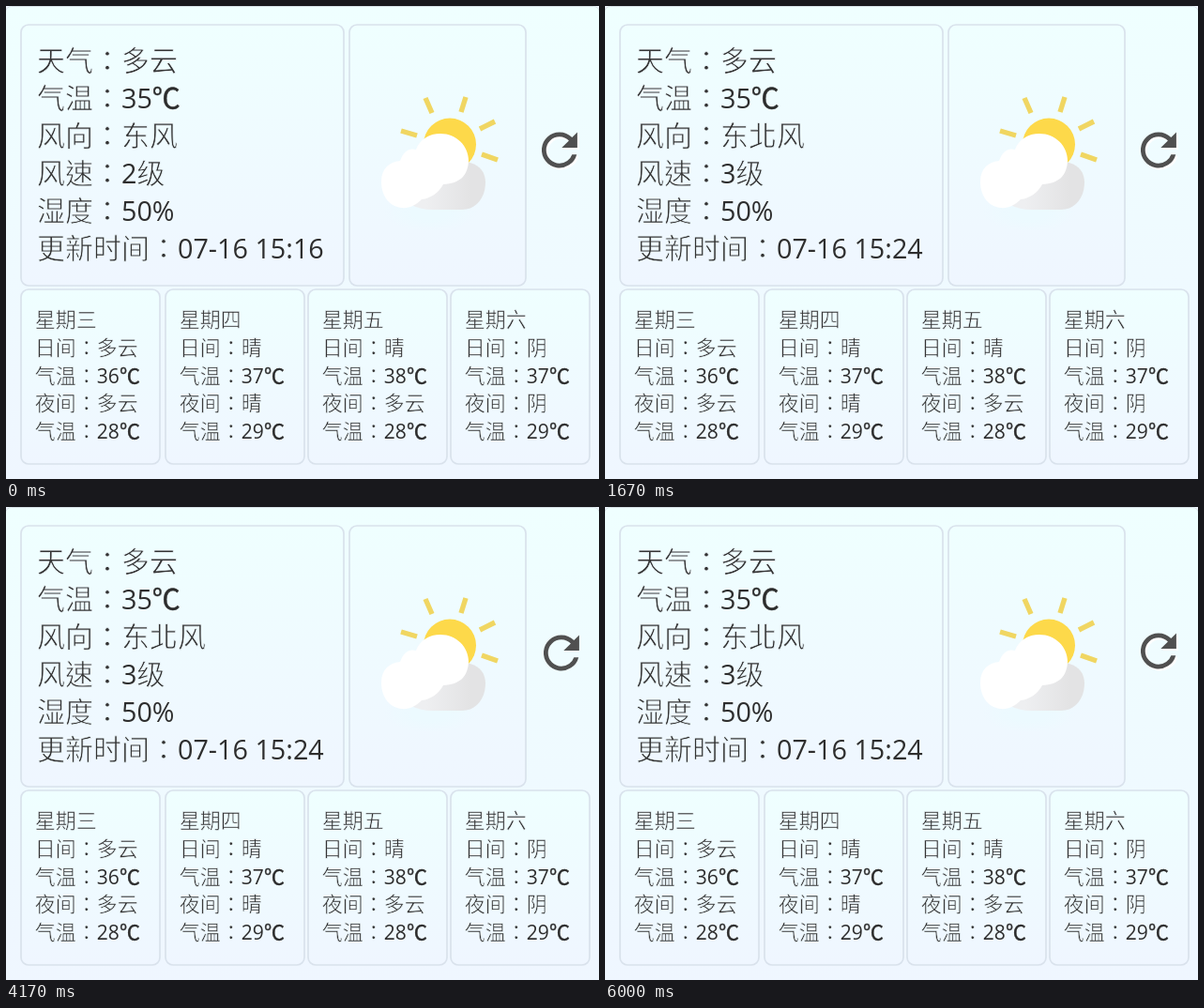
Animation of 632 by 504 pixels, one loop 6800 ms. Source, as an HTML page:

```html
<!DOCTYPE html>
<html lang="zh-TW">
<head>
<meta charset="utf-8">
<style>
  html, body { margin: 0; width: 632px; height: 504px; overflow: hidden; background: #f0f7ff; }
  svg { display: block; }
  text { font-family: "Open Sans", "Noto Sans", sans-serif; fill: #2e2e2e; white-space: pre; }
  /* the pale outline thins the strokes to a light weight */
  .han { font-family: "Noto Sans CJK TC", "Noto Sans CJK SC", "Noto Sans CJK", sans-serif; font-weight: 300; fill: #333; stroke: #effaff; stroke-width: .026em; }
  .unit { font-weight: 500; fill: #2c2c2c; stroke: #2c2c2c; stroke-width: .4; }
  .card { fill: url(#sky); stroke: #d9e2ec; stroke-width: 1.7; }
  .spinner { stroke: #747a7e; stroke-width: 2; }
  .rays { stroke: #f0d662; stroke-width: 5.4; }
</style>
</head>
<body>
<svg id="stage" width="632" height="504" viewBox="0 0 632 504">
  <defs>
    <linearGradient id="sky" x2="0" y2="1">
      <stop stop-color="#efffff"/><stop offset="1" stop-color="#eff6ff"/>
    </linearGradient>
    <linearGradient id="shade">
      <stop offset=".2" stop-color="#eeeff1"/><stop offset=".8" stop-color="#e3e3e4"/>
    </linearGradient>
    <radialGradient id="haze">
      <stop offset=".4" stop-color="#ecfaff"/><stop offset="1" stop-color="#ecfaff" stop-opacity="0"/>
    </radialGradient>
    <path id="reload" d="M17.65 6.35A7.96 7.96 0 0 0 12 4a8 8 0 1 0 7.73 10h-2.08A6 6 0 0 1 12 18a6 6 0 1 1 0-12c1.66 0 3.14.69 4.22 1.78L13 11h7V4z"/>
  </defs>
  <rect x="-.5" y=".5" width="633" height="510" rx="6" fill="url(#sky)" stroke="#d8e3e8"/>
  <g id="cards"></g>
  <g id="report">
    <g id="now"></g>
    <g id="days"></g>
    <ellipse cx="452" cy="220" rx="50" ry="20" fill="url(#haze)"/>
    <path class="rays" d="M447 98l7 16M490 97l-5 16M521 123l-16 8M507 158l17 6M421 133l17 5"/>
    <circle cx="473" cy="147.5" r="28" fill="#fdd94a"/>
    <path fill="url(#shade)" d="M432 212Q442 217 454 217H486C502 217 511 203 511 188C511 174 501 167 488 166L450 190Z"/>
    <path fill="#fff" d="M400 187C400 174 408 166 420 165C424 154 430 151 437 153C441 142 451 136 463 136C480 136 493 149 493 165C492 181 484 189 466 190C461 199 453 205 443 206C437 212 430 216 421 215C408 213 400 202 400 187Z"/>
  </g>
  <g id="spinners" class="spinner"></g>
  <g id="button">
    <use id="shine" href="#reload" fill="#fff" transform="translate(563.5 127) scale(2.37)"/>
    <use href="#reload" fill="#505050" transform="translate(561.5 125) scale(2.37)"/>
  </g>
</svg>
<script>
const $ = id => document.getElementById(id);
const LOOP = 6800, SPIN = 360 / 2000;

// each click: press, release (loading starts), loaded
const clicks = [[30, 130, 600], [1400, 1500, 1670], [2770, 2870, 3030], [4170, 4270, 4430], [5370, 5530, 6000]];

// x, y, width, height
const cards = [
  [16, 20, 344, 278], [366, 20, 188, 278],
  ...[16, 170, 322, 474].map(x => [x, 302, 148, 186])
];

const days = [
  ['三', '多云', 36, '多云', 28],
  ['四', '晴', 37, '晴', 29],
  ['五', '晴', 38, '多云', 28],
  ['六', '阴', 37, '阴', 29]
];

function line(str, x, y, size) {
  const spans = str.match(/[ -~]+|℃|[^ -~℃]+/g).map(run => {
    const latin = /[ -~]/.test(run);
    const kind = latin ? '' : run === '℃' ? 'han unit' : 'han';
    return `<tspan class="${kind}" font-size="${latin ? size * .958 : size}">${run}</tspan>`;
  });
  return `<text x="${x}" y="${y}">${spans.join('')}</text>`;
}

const block = (lines, x, y, step, size) =>
  lines.map((str, i) => line(str, x, y + i * step, size)).join('');

function showNow(wind, speed, time) {
  $('now').innerHTML = block(
    ['天气：多云', '气温：35℃', '风向：' + wind, `风速：${speed}级`, '湿度：50%', '更新时间：07-16 ' + time],
    33, 69.2, 40, 30);
}

$('cards').innerHTML = cards.map(([x, y, w, h]) =>
  `<rect class="card" x="${x}" y="${y}" width="${w}" height="${h}" rx="8"/>`).join('');

$('days').innerHTML = days.map(([day, sky, high, night, low], i) => block(
  ['星期' + day, '日间：' + sky, `气温：${high}℃`, '夜间：' + night, `气温：${low}℃`],
  cards[i + 2][0] + 14.8, 342, 29.8, 22)).join('');

const spokes = [...Array(8).keys()].map(i =>
  `<path d="M0 -5.5V-13" transform="rotate(${i * 45})"/>`).join('');
$('spinners').innerHTML = cards.map(([x, y, w, h]) =>
  `<g transform="translate(${x + w / 2} ${y + h / 2 + 1})"><g class="turn">${spokes}</g></g>`).join('');
const turns = document.querySelectorAll('.turn');

let fresh = null;
function draw(ms) {
  const t = ms % LOOP;
  const loading = clicks.find(([, start, end]) => t >= start && t < end);
  const pressed = clicks.some(([down, up]) => t >= down && t < up);

  const updated = t >= clicks[0][2];
  if (updated !== fresh) {
    fresh = updated;
    updated ? showNow('东北风', 3, '15:24') : showNow('东风', 2, '15:16');
  }
  $('report').style.display = loading ? 'none' : '';
  $('spinners').style.display = loading ? '' : 'none';
  if (loading)
    turns.forEach(g => g.setAttribute('transform', `rotate(${(t - loading[1]) * SPIN})`));

  $('button').setAttribute('transform', pressed ? 'translate(2 2)' : '');
  $('shine').style.display = pressed ? 'none' : '';
}

const begin = performance.now();
function tick() {
  draw(performance.now() - begin);
  requestAnimationFrame(tick);
}
tick();
</script>
</body>
</html>
```
